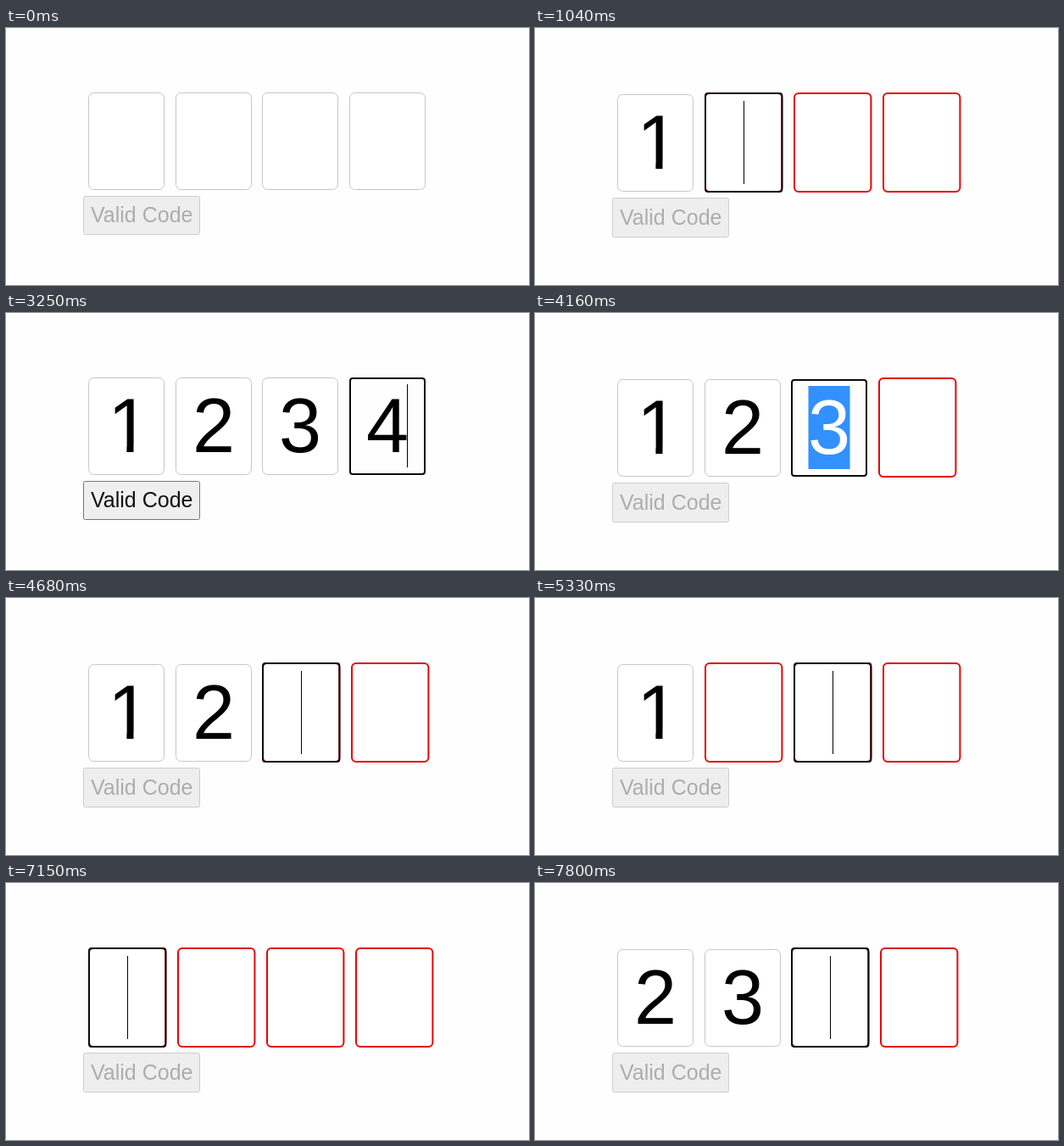
These frames come from a looping animation (617 px wide and 303 px high, 8000 ms). An HTML page:

```html
<!DOCTYPE html>
<html lang="en">
<head>
<meta charset="utf-8">
<title>Code input</title>
<style>
  html, body { margin: 0; width: 100%; height: 100%; overflow: hidden; background: #fefefe; }
  svg { display: block; width: 617px; height: 303px; font-family: "Liberation Sans", Arial, sans-serif; }
  .digit { font-size: 90px; text-anchor: middle; }
  .label { font-size: 25px; }
</style>
</head>
<body>
<svg viewBox="0 0 617 303">
  <defs>
    <!-- leaves the numeral one without its foot -->
    <clipPath id="stem"><path d="M-40-80H40V-7H8.5V2H.4V-7H-40Z"/></clipPath>
  </defs>
  <g id="form"></g>
</svg>
<script>
const LOOP = 8000;
const form = document.getElementById("form");

// [start ms, digits ("-" is empty), focused field, cursor]
const steps = [
  [0, "----", -1, "none"],
  [650, "----", 0, "caret"],
  [1040, "1---", 1, "caret"],
  [1430, "12--", 2, "caret"],
  [1820, "123-", 3, "caret"],
  [2210, "1234", 3, "caret"],
  [2730, "1234", 3, "none"],
  [3250, "1234", 3, "caret"],
  [3770, "1234", 3, "none"],
  [3900, "123-", 3, "caret"],
  [4160, "123-", 2, "select"],
  [4290, "12--", 3, "caret"],
  [4680, "12--", 2, "caret"],
  [4940, "12--", 1, "select"],
  [5330, "1---", 2, "caret"],
  [5590, "1---", 1, "caret"],
  [5720, "1---", 0, "select"],
  [6110, "----", 1, "caret"],
  [6630, "----", 1, "none"],
  [7150, "----", 0, "caret"],
  [7410, "2---", 1, "caret"],
  [7800, "23--", 2, "caret"]
];
const FIRST_ENTRY = 1040;

function frame(x, y, w, h, line, color, radius, fill = "none") {
  const half = line / 2;
  return `<rect x="${x + half}" y="${y + half}" width="${w - line}" height="${h - line}"
    rx="${radius}" fill="${fill}" stroke="${color}" stroke-width="${line}"/>`;
}

function bar(x, y, w, color) {
  return `<rect x="${x}" y="${y}" width="${w}" height="98" fill="${color}"/>`;
}

function numeral(digit, cx, baseline, color) {
  const one = digit === "1";
  return `<g transform="translate(${cx} ${baseline})"${one ? ' clip-path="url(#stem)"' : ""}>
    <text class="digit" x="${one ? 2.9 : 0}" fill="${color}">${digit}</text></g>`;
}

function field(x, shift, digit, invalid, focused, cursor) {
  const w = invalid ? 92.4 : 90;
  const h = invalid ? 118 : 115;
  const y = invalid ? 76 : 76 + shift;
  const cx = x + w / 2;
  const empty = digit === "-";
  const selected = focused && cursor === "select";
  let out = "";
  if (invalid) out += frame(x, y, w, h, 2, "#e00808", 5, "#fff");
  else if (!focused) out += frame(x, y, w, h, 1, "#c6c6c6", 6, "#fff");
  if (focused) out += frame(x, y, w, h, 2, "#0a0a0a", 3);
  if (selected) out += bar(cx - 24.5, 84 + shift, 49, "#3390ff");
  if (!empty) out += numeral(digit, cx, 163.5 + shift, selected ? "#fff" : "#000");
  if (focused && cursor === "caret")
    out += bar(Math.round(empty ? cx - .5 : cx + 23), 84 + shift, 1, "#000");
  return out;
}

function button(shift, enabled) {
  const y = 198 + shift;
  return frame(91, y, 138, shift ? 47 : 46, 1, enabled ? "#767676" : "#cdcdcd", 2, enabled ? "#efefef" : "#eee") +
    `<text class="label" x="100" y="${229 + shift * 1.4}" fill="${enabled ? "#111" : "#adadad"}">Valid Code</text>`;
}

function draw([start, digits, focus, cursor]) {
  const checked = start >= FIRST_ENTRY;
  const complete = !digits.includes("-");
  const shift = checked && !complete ? 2 : 0;
  let x = 97;
  let out = "";
  [...digits].forEach((digit, i) => {
    const invalid = checked && digit === "-";
    out += field(Math.round(x), shift, digit, invalid, i === focus, cursor);
    x += (invalid ? 92.4 : 90) + 12.6;
  });
  form.innerHTML = out + button(shift, complete);
}

let shown = null;
const origin = performance.now();
function tick() {
  const time = (performance.now() - origin) % LOOP;
  const step = steps.findLast(([start]) => start <= time);
  if (step !== shown) draw(shown = step);
  requestAnimationFrame(tick);
}
tick();
</script>
</body>
</html>
```
